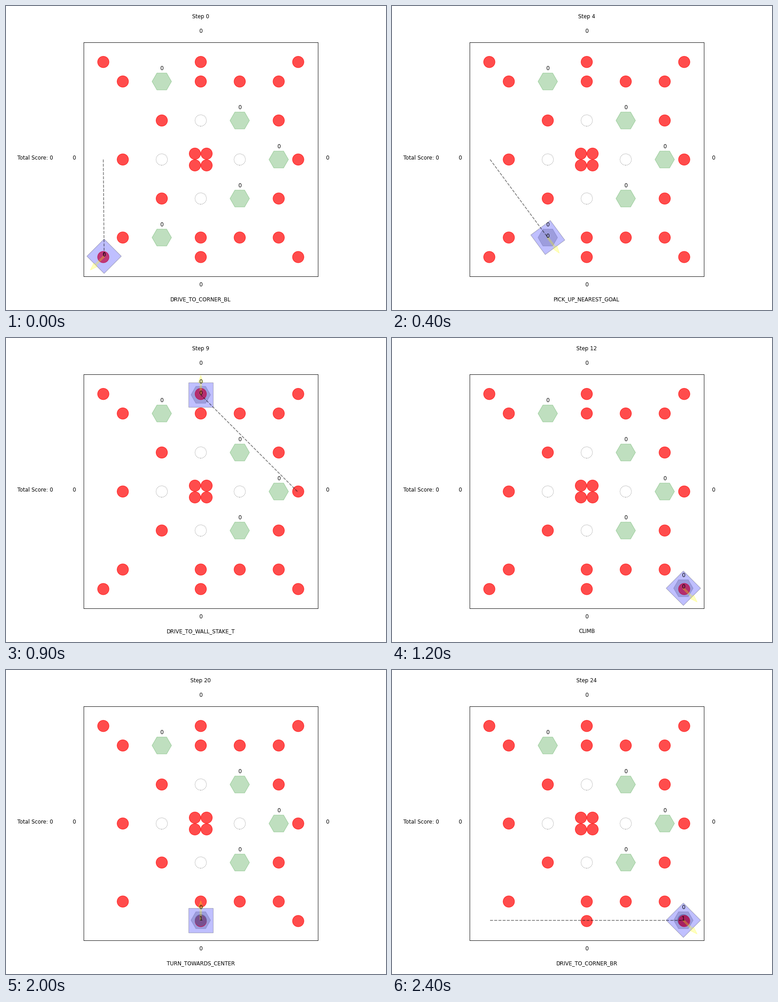
Animation of 837x669 px, one loop 2500 ms. Source, as a matplotlib script:

```python
import math
import matplotlib.pyplot as plt
from matplotlib.animation import FuncAnimation
from matplotlib.patches import Circle, Rectangle, RegularPolygon

DPI = 83.65
FIELD = 144
MID = FIELD / 2
SIDE = 15
NEAR = 12.5
FAR = FIELD - NEAR

RINGS = [(12, 72 + 60), (72, 132), (132, 132),
         (24, 120), (72, 120), (96, 120), (120, 120),
         (48, 96), (120, 96), (24, 72), (132, 72),
         (48, 48), (120, 48),
         (24, 24), (72, 24), (96, 24), (120, 24),
         (72, 12), (12, 12), (132, 12)]
RINGS += [(MID + dx, MID + dy) for dx in (-3.6, 3.6) for dy in (-3.6, 3.6)]
GOALS = [(48, 24), (48, 120), (96, 48), (96, 96), (120, 72)]
POSTS = [(48, 72), (72, 48), (96, 72), (72, 96)]
TAKEN_GOAL, TAKEN_RING = (48, 24), (12, 12)

# Drive targets: x, y, heading in degrees
SPOTS = {
    "CORNER_BL": (NEAR, NEAR, 225),
    "CORNER_BR": (FAR, NEAR, 315),
    "WALL_STAKE_L": (NEAR, MID, 180),
    "WALL_STAKE_R": (FAR, MID, 0),
    "WALL_STAKE_T": (MID, FAR, 90),
    "WALL_STAKE_B": (MID, NEAR, 270),
}
GOAL, RING = "PICK_UP_NEAREST_GOAL", "PICK_UP_NEAREST_RING"
TURN, CLIMB = "TURN_TOWARDS_CENTER", "CLIMB"
PLAN = ["CORNER_BL", TURN, "WALL_STAKE_T", "WALL_STAKE_L", GOAL,
        "CORNER_BL", "WALL_STAKE_L", TURN, "WALL_STAKE_R", "WALL_STAKE_T",
        TURN, "CORNER_BR", CLIMB, "WALL_STAKE_T", TURN,
        "WALL_STAKE_L", "CORNER_BL", TURN, RING, "WALL_STAKE_B",
        TURN, "WALL_STAKE_R", TURN, "CORNER_BL", "CORNER_BR"]


def heading(a, b):
    return math.degrees(math.atan2(b[1] - a[1], b[0] - a[0]))


def simulate():
    pos, angle = (12, MID), 0
    has_goal = has_ring = False
    states = []
    for act in PLAN:
        old = pos
        name = act
        if act in SPOTS:
            name = "DRIVE_TO_" + act
            x, y, angle = SPOTS[act]
            pos = (x, y)
        elif act == TURN:
            angle = heading(pos, (MID, MID))
        elif act == GOAL:
            pos, has_goal = TAKEN_GOAL, True
            angle = heading(old, pos)
        elif act == RING:
            pos, has_ring = TAKEN_RING, True
            angle = heading(old, pos)
        states.append((name, old, pos, angle, has_goal, has_ring))
    return states


STATES = simulate()
fig, ax = plt.subplots(figsize=(837.01 / DPI, 669.01 / DPI), dpi=DPI)


def label(x, y, s):
    ax.text(x, y, s, ha="center", fontsize=10, family="DejaVu Sans")


def draw(i):
    name, old, pos, angle, has_goal, has_ring = STATES[i]
    ax.clear()
    ax.set(xlim=(0, FIELD), ylim=(0, FIELD), aspect="equal",
           xticks=[], yticks=[])

    for g in GOALS:
        held = has_goal and g == TAKEN_GOAL
        p = pos if held else g
        ax.add_patch(RegularPolygon(p, 6, radius=6, orientation=math.pi / 6,
                                    color="gray" if held else "green",
                                    alpha=0.35 if held else 0.25))
        label(p[0], p[1] + 7, "0")

    for p in POSTS:
        ax.add_patch(Circle(p, 3.5, fill=False, ec="black",
                            ls="dotted", alpha=0.5))

    for r in RINGS:
        held = has_ring and r == TAKEN_RING
        ax.add_patch(Circle(pos if held else r, 3.5,
                            color="gray" if held else "red", alpha=0.7))

    x, y = pos
    ax.add_patch(Rectangle((x - SIDE / 2, y - SIDE / 2), SIDE, SIDE,
                           angle=angle, rotation_point="center",
                           fc="blue", ec="black", alpha=0.25))
    a = math.radians(angle)
    ax.arrow(x, y, SIDE / 2 * math.cos(a), SIDE / 2 * math.sin(a),
             width=1, color="yellow", alpha=0.25)
    if old != pos:
        ax.plot([old[0], x], [old[1], y], "k--", alpha=0.5)
    label(x, y, str(int(has_ring)))

    for p in ((-6, MID), (150, MID), (MID, 150), (MID, -6)):
        label(*p, "0")
    label(MID, 159, f"Step {i}")
    label(MID, -15, name)
    label(-30, MID, "Total Score: 0")
    return []


anim = FuncAnimation(fig, draw, frames=len(PLAN), interval=100,
                     init_func=lambda: draw(0), repeat=True, repeat_delay=0)
plt.show()
```
